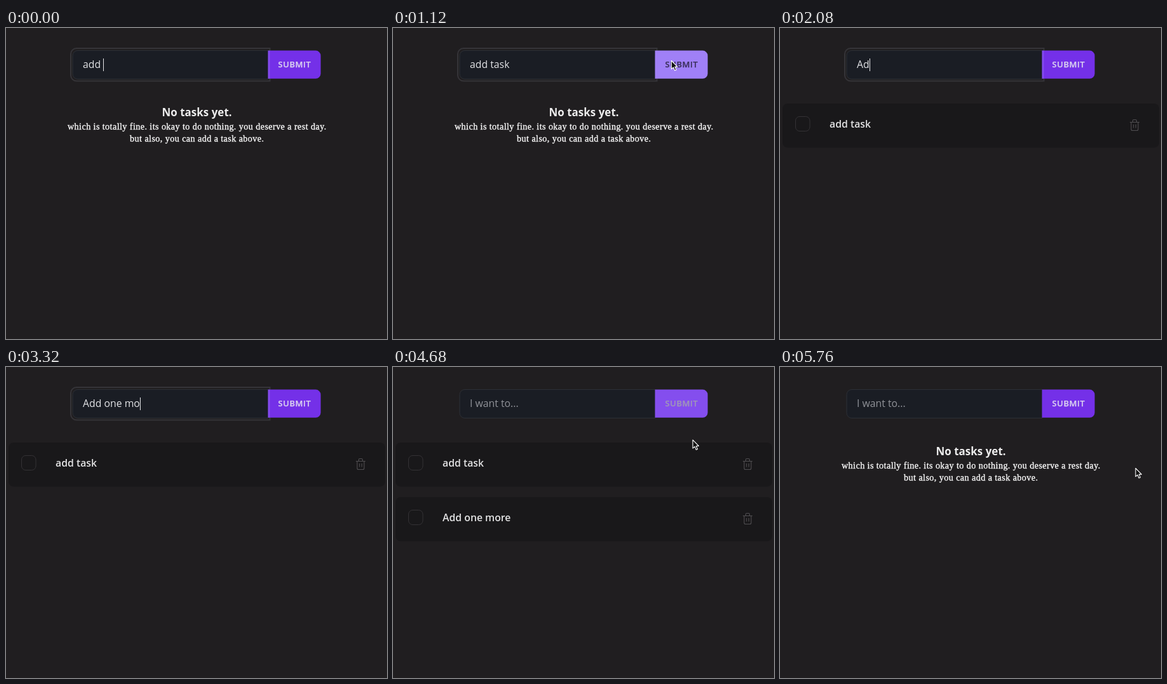
These frames come from a looping animation (600x490 px, 5.8 s). An HTML page with a canvas:

```html
<!DOCTYPE html>
<html lang="en">
<head>
<meta charset="utf-8">
<title>Task list</title>
<style>
html, body { margin: 0; width: 100%; height: 100%; overflow: hidden; background: #201e20; }
canvas { display: block; }
</style>
</head>
<body>
<canvas id="stage" width="600" height="490"></canvas>
<script>
const ctx = document.getElementById('stage').getContext('2d');
const LOOP = 5800;
const SANS = '"Open Sans", "Noto Sans", sans-serif';
const SERIF = '"Liberation Serif", "Noto Serif", serif';

const clamp = v => Math.max(0, Math.min(1, v));
const ease = v => v * v * (3 - 2 * v);
const within = (t, spans) => spans.some(([a, b]) => t >= a && t < b);

// Typed text: the start, then the time each following letter lands
const entries = [
  { from: 0, until: 1200, text: 'add task', shown: 4, keys: [80, 200, 320, 400] },
  { from: 1200, until: 4360, text: 'Add one more', shown: 0,
    keys: [1920, 2040, 2200, 2320, 2720, 2840, 2920, 3040, 3160, 3280, 3360, 3480] }
];
const focusSpans = [[0, 1200], [1560, 4360]];
const caretSpans = [[0, 900], [1560, 2560], [2720, 3980]];
const hoverSpans = [[560, 1380], [3800, 4580]];
const tasks = [
  { text: 'add task', y: 119, from: 1170, until: 5720 },
  { text: 'Add one more', y: 205, from: 4350, until: 5200 }
];

// Pointer runs: [time, x, y]
const runs = [
  [[440, 454, 115], [640, 441, 56], [1000, 438.5, 51.5], [1320, 438.5, 51.5], [1560, 350, 58], [1920, 346, 58]],
  [[3560, 330, 60], [3740, 520, 60], [4040, 428.5, 61.5], [4480, 428.5, 61.5], [5000, 559.5, 222],
   [5320, 559.5, 222], [5580, 560, 159.5], [LOOP, 560, 159.5]]
];

// A positive weight thickens the letters by that many pixels
function label(text, x, y, font, color, { align = 'left', spacing = 0, weight = 0 } = {}) {
  ctx.font = font;
  ctx.fillStyle = ctx.strokeStyle = color;
  ctx.textAlign = align;
  ctx.letterSpacing = spacing + 'px';
  ctx.fillText(text, x, y);
  if (weight) {
    ctx.lineWidth = weight;
    ctx.strokeText(text, x, y);
  }
}

function box(x, y, w, h, radius, fill, stroke, width = 1) {
  ctx.beginPath();
  ctx.roundRect(x, y, w, h, radius);
  if (fill) { ctx.fillStyle = fill; ctx.fill(); }
  if (stroke) { ctx.strokeStyle = stroke; ctx.lineWidth = width; ctx.stroke(); }
}

function line(path, x, y, color, width, fill) {
  const shape = new Path2D(path);
  ctx.save();
  ctx.translate(x, y);
  if (fill) { ctx.fillStyle = fill; ctx.fill(shape); }
  ctx.strokeStyle = color;
  ctx.lineWidth = width;
  ctx.lineJoin = 'round';
  ctx.stroke(shape);
  ctx.restore();
}

function mix(a, b, k) {
  return `rgb(${a.map((v, i) => Math.round(v + (b[i] - v) * k))})`;
}

function drawForm(t) {
  const focused = within(t, focusSpans);
  const hover = Math.max(...hoverSpans.map(([a, b]) =>
    Math.min(clamp((t - a) / 160), 1 - clamp((t - b) / 160))));

  if (focused) box(102, 32, 313.5, 51.5, [9, 0, 0, 9], null, '#353438', 2);
  box(105, 35.5, 308, 45, [8, 0, 0, 8], '#1a1d24', '#2d3036');
  box(412.6, 35.6, 83, 44.2, [0, 8, 8, 0], mix([116, 48, 232], [160, 128, 247], hover));
  if (focused && hover < 0.5) {
    ctx.fillStyle = 'rgba(170,140,255,.28)';
    ctx.fillRect(412.6, 35.6, 3, 44.2);
  }
  label('SUBMIT', 428.6, 62, `600 13px ${SANS}`,
    mix([217, 209, 240], [59, 48, 92], hover), { spacing: 0.5, weight: 0.25 });

  const entry = entries.find(e => t >= e.from && t < e.until);
  const count = entry ? entry.shown + entry.keys.filter(k => t >= k).length : 0;
  const text = entry ? entry.text.slice(0, count) : '';
  const font = `500 15.8px ${SANS}`;
  if (text) label(text, 121, 63, font, '#e2e3e6');
  else label('I want to...', 121, 63, font, '#909298');
  if (within(t, caretSpans)) {
    ctx.font = font;
    ctx.fillStyle = '#e6e7e9';
    ctx.fillRect(Math.round(121 + ctx.measureText(text).width), 48, 1, 20);
  }
}

function drawEmpty() {
  label('No tasks yet.', 300.5, 139, `700 17px ${SANS}`, '#ececec', { align: 'center' });
  const font = `14.2px ${SERIF}`;
  const style = { align: 'center', spacing: 0.4, weight: 0.35 };
  label('which is totally fine. its okay to do nothing. you deserve a rest day.',
    300.8, 160, font, '#f8f8f8', style);
  label('but also, you can add a task above.', 300.8, 179, font, '#f8f8f8', style);
}

function drawTask({ text, y, from }, t) {
  ctx.globalAlpha = clamp((t - from) / 110);
  box(4, y, 593, 69.5, 8, '#19181a');
  box(24.5, y + 20.5, 22.5, 23, 6.5, null, '#343235');
  label(text, 78, y + 38, `600 15.8px ${SANS}`, '#e2e2e3');
  line('M0 4H15M4.5 4V1.5Q4.5 0 6 0H9Q10.5 0 10.5 1.5V4M2 4V15Q2 17 4 17H11Q13 17 13 15V4M5.7 7.5V13M9.3 7.5V13',
    551, y + 25.5, '#504e51', 1.1);
  ctx.globalAlpha = 1;
}

function drawPointer(t) {
  const run = runs.find(r => t >= r[0][0] && t < r.at(-1)[0]);
  if (!run) return;
  const i = run.findIndex(p => p[0] > t);
  const [a, b] = [run[i - 1], run[i]];
  const k = ease((t - a[0]) / (b[0] - a[0]));
  const x = a[1] + (b[1] - a[1]) * k;
  const y = a[2] + (b[2] - a[2]) * k;
  if (x > 105 && x < 413 && y > 35 && y < 81) {
    line('M-3 -8Q0 -8 0 -6V6Q0 8 3 8M3 -8Q0 -8 0 -6M0 6Q0 8 -3 8', x, y, '#d8d8d8', 1);
  } else {
    line('M0 0V13.2L3.1 10.5L5.2 15.5L7.5 14.6L5.4 9.6H9.4Z', x, y, '#fff', 1.1, '#111');
  }
}

function frame(now) {
  const t = now % LOOP;
  ctx.fillStyle = '#201e20';
  ctx.fillRect(0, 0, 600, 490);
  drawForm(t);
  const live = tasks.filter(task => t >= task.from && t < task.until);
  if (live.length) live.forEach(task => drawTask(task, t));
  else drawEmpty();
  drawPointer(t);
  requestAnimationFrame(frame);
}
requestAnimationFrame(frame);
</script>
</body>
</html>
```
